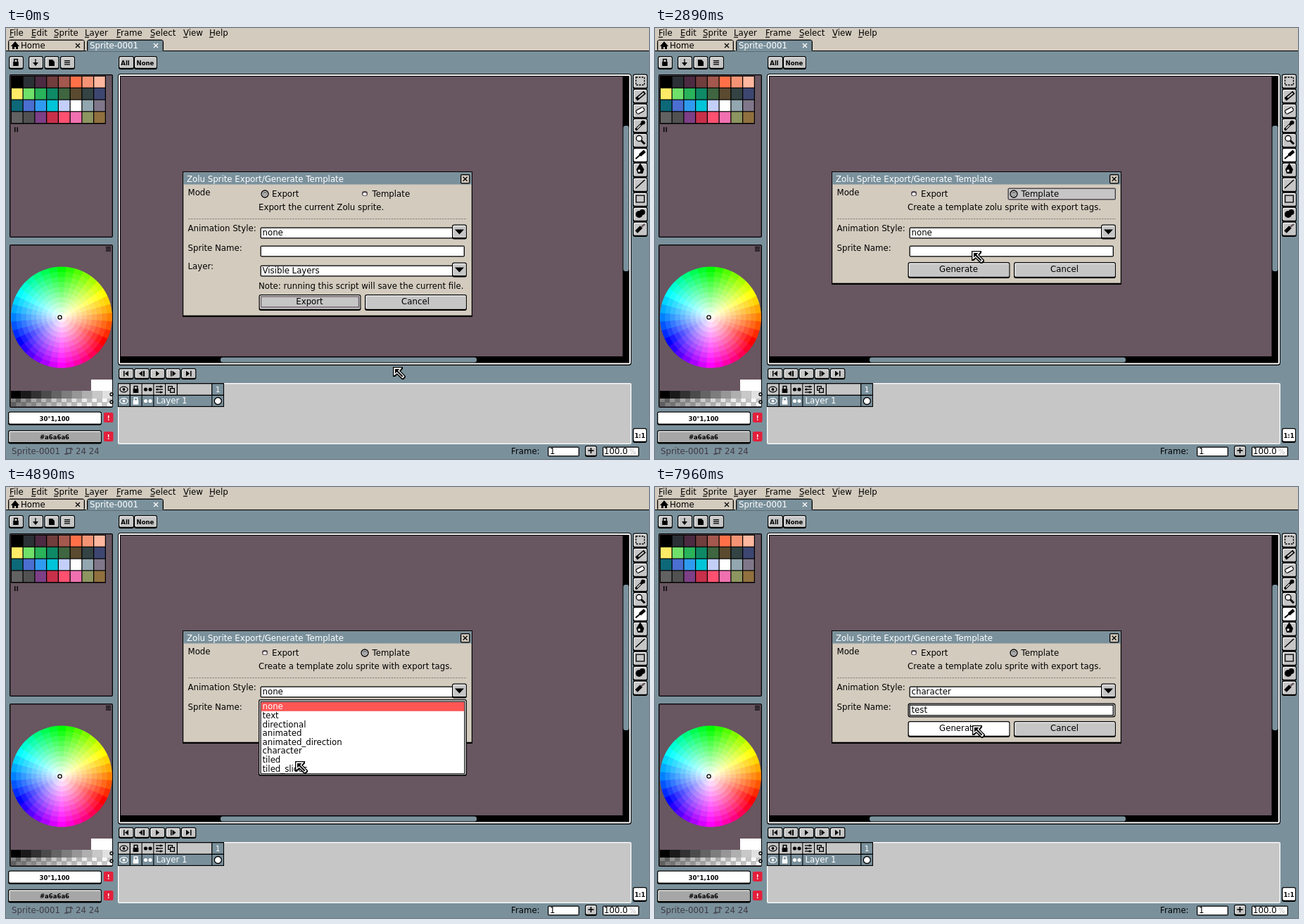
Write an HTML page with a canvas that moves like this. It is 914 px wide and 613 px high and loops after 8 s.

```html
<!DOCTYPE html>
<html lang="en">
<head>
<meta charset="utf-8">
<title>Sprite export dialog</title>
<style>
html, body { margin: 0; width: 100%; height: 100%; overflow: hidden; background: #7d929e; }
canvas { display: block; }
</style>
</head>
<body>
<canvas id="stage" width="914" height="613"></canvas>
<script>
const W = 914, H = 613, LOOP = 8000;
const FACE = '#d3cbbe', SLATE = '#7a919c', PLUM = '#685661', GRAY = '#c6c6c6',
      RED = '#ff5555', HOT = '#ffebb6', BLACK = '#000', WHITE = '#fff';
const screenCtx = document.getElementById('stage').getContext('2d');
const backdrop = document.createElement('canvas');
backdrop.width = W;
backdrop.height = H;
let g = backdrop.getContext('2d');

// Drawing helpers
function rect(x, y, w, h, color) {
  g.fillStyle = color;
  g.fillRect(x, y, w, h);
}
function round(x, y, w, h, color, r = 2) {
  g.fillStyle = color;
  g.beginPath();
  g.roundRect(x, y, w, h, r);
  g.fill();
}
function framed(x, y, w, h, fill, edge = BLACK, line = 1.3, r = 2) {
  round(x, y, w, h, edge, r);
  rect(x + line, y + line, w - 2 * line, h - 2 * line, fill);
}
function label(s, x, y, color = BLACK, size = 11.75, weight = 'normal', align = 'left') {
  g.font = `${weight} ${size}px "DejaVu Sans", sans-serif`;
  g.textAlign = align;
  g.fillStyle = color;
  g.fillText(s, x, y);
}
function mini(s, x, y, color = BLACK) {
  label(s, x, y, color, 8.5, 'bold', 'center');
}
function poly(points, color) {
  g.fillStyle = color;
  g.beginPath();
  points.forEach(([x, y]) => g.lineTo(x, y));
  g.fill();
}
function line(x1, y1, x2, y2, color = BLACK, width = 1.3) {
  g.strokeStyle = color;
  g.lineWidth = width;
  g.beginPath();
  g.moveTo(x1, y1);
  g.lineTo(x2, y2);
  g.stroke();
}
function disc(x, y, r, fill, stroke) {
  g.beginPath();
  g.arc(x, y, r, 0, 2 * Math.PI);
  if (fill) { g.fillStyle = fill; g.fill(); }
  if (stroke) { g.strokeStyle = stroke; g.lineWidth = 1.3; g.stroke(); }
}
function button(x, y, w, h, fill = GRAY) {
  round(x, y, w, h, BLACK, 3);
  round(x + 1.3, y + 1.3, w - 2.6, h - 3.9, WHITE, 1.5);
  rect(x + 2.5, y + 2.5, w - 3.8, h - 5.1, fill);
}
function cross(x, y, r, color = BLACK) {
  line(x - r, y - r, x + r, y + r, color);
  line(x - r, y + r, x + r, y - r, color);
}
function lock(x, y, color = BLACK) {
  rect(x - 3.8, y - 1, 7.6, 6, color);
  g.strokeStyle = color;
  g.lineWidth = 1.5;
  g.strokeRect(x - 2.3, y - 4.5, 4.6, 4.5);
}
function eye(x, y, color) {
  g.strokeStyle = color;
  g.lineWidth = 1.3;
  g.beginPath();
  g.ellipse(x, y, 5.5, 3.8, 0, 0, 2 * Math.PI);
  g.stroke();
  disc(x, y, 1.9, color);
}
function burger(x, y, w = 7) {
  for (let i = 0; i < 3; i++) rect(x, y + i * 2.6, w, 1.3, BLACK);
}

// Application window behind the dialog
function drawMenuAndTabs() {
  rect(0, 0, W, H, SLATE);
  rect(0, 0, W, 32, FACE);
  const menu = { File: 5, Edit: 36, Sprite: 68, Layer: 112, Frame: 157, Select: 205, View: 252, Help: 289 };
  for (const [name, x] of Object.entries(menu)) {
    label(name, x, 11);
    rect(x, 12.5, 6, 1.2, BLACK);
  }
  framed(3, 16.5, 109, 17, FACE, BLACK, 1.3, 4);
  framed(115, 16.5, 109, 18, SLATE, BLACK, 1.3, 4);
  rect(0, 32, 114, 1.3, BLACK);
  rect(224, 32, W, 1.3, BLACK);
  rect(0, 33.3, W, 4, SLATE);
  poly([[7, 26], [13, 19], [19, 26], [17, 26], [17, 30], [14, 30], [14, 27], [12, 27], [12, 30], [9, 30], [9, 26]], BLACK);
  label('Home', 21, 29);
  cross(102, 25, 3);
  label('Sprite-0001', 119, 29, WHITE);
  cross(213, 25, 3, WHITE);

  for (const x of [4, 32, 54.5, 77]) button(x, 40, 21, 19);
  lock(14, 49);
  line(42, 44, 42, 53);
  poly([[38, 49], [46, 49], [42, 54]], BLACK);
  poly([[61, 45], [66, 45], [69, 48], [69, 54], [61, 54]], BLACK);
  burger(83, 46, 8);
  button(160, 40, 22, 19);
  button(182, 40, 33, 19);
  mini('All', 169.5, 53);
  mini('None', 198, 53);
}

function drawPalette() {
  framed(5, 66, 147, 232, PLUM);
  const swatches = ('000000 2b3036 4b2a42 713d3d a4584e ff7048 f49474 ffb8a0 ' +
    'ffeb66 6fe06a 29b35a 0f8a66 3f6640 5a4a30 344343 3d4670 ' +
    '0d6878 4a6fd0 2f9bf0 00c4d8 c3cff8 ffffff 92a7b0 80788a ' +
    '626262 515151 7d3f86 c8304a ff5070 f070b0 8d9560 91703f').split(' ');
  rect(7, 68, 135, 68.5, BLACK);
  swatches.forEach((c, i) => rect(8 + (i % 8) * 16.75, 69 + (i >> 3) * 16.8, 15.5, 15.6, '#' + c));
  rect(12, 141, 1.4, 7, BLACK);
  rect(15.5, 141, 1.4, 7, BLACK);
}

function drawWheel() {
  framed(5, 308, 147, 232, PLUM);
  burger(142, 311);
  const rings = 10, step = 10, cx = 79, cy = 411.5, radius = 72;
  for (let ring = rings; ring > 0; ring--) {
    const light = 100 - 50 * (ring - 0.5) / (rings - 0.5);
    for (let a = 0; a < 360; a += step) {
      const from = -(a + step / 2 + 0.4) * Math.PI / 180, to = -(a - step / 2) * Math.PI / 180;
      g.fillStyle = `hsl(${30 + a} 100% ${light}%)`;
      g.beginPath();
      g.moveTo(cx, cy);
      g.arc(cx, cy, radius * ring / rings, from, to);
      g.fill();
    }
  }
  disc(76.5, 411.5, 2.6, WHITE, BLACK);

  rect(121, 500, 30, 16, WHITE);
  for (let i = 0; i < 10; i++) {
    const v = Math.min(255, i * 25), x = 7 + i * 14.4;
    rect(x, 516, 14.5, 11, `rgb(${v},${v},${v})`);
    for (let k = 0; k < 4; k++) {
      rect(x + (k % 2) * 7.2, 527 + (k >> 1) * 5.5, 7.3, 5.5, (k === 0 || k === 3) ? WHITE : '#c0c0c0');
    }
    rect(x, 527, 14.5, 11, `rgba(${v},${v},${v},${0.5 - i * 0.04})`);
  }
  disc(150, 521, 2, null, BLACK);
  disc(150, 532, 2, null, BLACK);

  button(3, 545.5, 133, 19.5, WHITE);
  mini('30°1,100', 69, 559);
  button(3, 572, 133, 19.5, '#a6a6a6');
  mini('#a6a6a6', 69, 585);
  for (const y of [547, 574]) {
    round(139, y, 13.5, 14, '#e3203c', 2);
    mini('!', 145.7, y + 10.5, WHITE);
  }
}

function drawEditor() {
  round(159, 65, 730, 415, BLACK, 4);
  round(160, 66, 728, 412.5, WHITE, 3);
  rect(162, 68, 724, 408.5, BLACK);
  rect(163, 69, 713.5, 398, PLUM);
  round(877.5, 139, 8, 207, SLATE, 3);
  round(305, 468.5, 364, 7, SLATE, 3);
}

function drawTimeline() {
  for (let i = 0; i < 5; i++) button(160 + i * 22.2, 484, 21.6, 16);
  const left = (x, y) => poly([[x, y], [x + 5, y - 4], [x + 5, y + 4]], BLACK);
  const right = (x, y) => poly([[x, y - 4], [x + 5, y], [x, y + 4]], BLACK);
  rect(167, 487.5, 1.5, 8, BLACK); left(169, 491.5);
  left(189, 491.5); rect(195, 487.5, 2, 8, BLACK);
  right(213, 491.5);
  rect(234, 487.5, 1.5, 8, BLACK); right(236.5, 491.5);
  right(256, 491.5); rect(262, 487.5, 1.5, 8, BLACK);

  framed(159, 505, 730, 87, GRAY, WHITE, 1.3);
  rect(159, 505, 151, 34, BLACK);
  [160, 177, 193.7, 210.4, 227.1].forEach(x => rect(x, 506.3, 15.6, 15.3, GRAY));
  rect(244, 506.3, 48, 15.3, GRAY);
  rect(293.3, 506.3, 15.6, 15.3, SLATE);
  [160, 177, 193.7].forEach(x => rect(x, 523, 15.6, 14.8, SLATE));
  rect(210.4, 523, 81.8, 14.8, SLATE);
  rect(293.3, 523, 15.6, 14.8, SLATE);
  [[514, BLACK], [530.5, WHITE]].forEach(([y, c]) => {
    eye(167.5, y, c);
    lock(184.5, y, c);
    disc(198.5, y, 2.6, c);
    disc(205, y, 2.6, c);
  });
  for (let i = 0; i < 3; i++) {
    line(213, 510 + i * 4, 223, 510 + i * 4);
    disc(i === 1 ? 215 : 220, 510 + i * 4, 1.6, BLACK);
  }
  framed(230, 509, 7, 7, GRAY, BLACK, 1.3, 0);
  framed(233, 512, 7, 7, GRAY, BLACK, 1.3, 0);
  label('1', 301, 518, WHITE, 10.5, 'normal', 'center');
  label('Layer 1', 213.5, 534, WHITE);
  disc(301.3, 530.5, 5, WHITE, BLACK);
}

function drawTools() {
  for (let i = 0; i < 11; i++) button(891, 65.5 + i * 21, 21, 21.5, i === 5 ? WHITE : GRAY);
  g.setLineDash([2.5, 1.5]);
  g.strokeStyle = BLACK;
  g.lineWidth = 1.3;
  g.strokeRect(895.5, 70, 12, 11);
  g.setLineDash([]);
  const pen = (y, color) => {
    line(896, y + 5, 908, y - 5, BLACK, 5);
    line(899, y + 2.5, 906.5, y - 3.8, color, 2.2);
  };
  pen(96.5, GRAY);
  g.save();
  g.translate(901.5, 117.5);
  g.rotate(-0.5);
  framed(-6.5, -3.5, 13, 7, WHITE, BLACK, 1.3, 3);
  g.restore();
  line(895, 145, 904, 136, BLACK, 3.5);
  disc(905.5, 134.5, 3, BLACK);
  line(897, 143, 902, 138, WHITE, 1.2);
  disc(900, 157, 4, WHITE, BLACK);
  line(903, 160, 908, 165, BLACK, 3);
  line(895, 186, 902, 180, BLACK, 2);
  line(901, 181, 908, 175, BLACK, 4.5);
  poly([[901.5, 192], [907, 201], [905, 207], [898, 207], [896, 201]], BLACK);
  disc(900, 203, 1.7, WHITE);
  line(895, 228, 908, 216, BLACK, 1.5);
  framed(895, 237.5, 13, 11, GRAY, BLACK, 1.3, 0);
  disc(900, 265, 5, BLACK);
  disc(904.5, 262, 4, BLACK);
  line(896, 290, 903, 283, BLACK, 5);
  line(903, 283, 908, 279, PLUM, 2.5);
  button(891, 569, 20, 21, WHITE);
  mini('1:1', 901, 583);
}

function drawStatus() {
  const ink = '#403a44';
  label('Sprite-0001', 8, 606, ink);
  g.strokeStyle = ink;
  g.lineWidth = 1.2;
  g.strokeRect(86, 598, 6, 7);
  line(83, 606, 88, 606, ink);
  line(92, 597, 95, 600, ink);
  label('24 24', 99, 606, ink);
  label('Frame:', 718, 606);
  framed(770, 595.5, 45, 14, WHITE);
  label('1', 773, 606);
  button(823, 594, 17, 16);
  line(827.5, 601, 835.5, 601, BLACK, 1.6);
  line(831.5, 597, 831.5, 605, BLACK, 1.6);
  framed(848, 595.5, 52, 14, WHITE);
  label('100.0', 850, 606);
  label('%', 886, 606, '#bbb', 10);
}

// Dialog
const STYLES = ['none', 'text', 'directional', 'animated', 'animated_direction', 'character', 'tiled', 'tiled_slices'];
const TYPED_AT = [7130, 7210, 7290, 7360];
const TEXT = 'test';

function radio(x, y, on) {
  if (on) {
    disc(x, y, 5, GRAY, BLACK);
    round(x - 2.8, y - 3, 5.6, 5.6, '#777', 2);
    rect(x - 2, y - 0.7, 4, 2, GRAY);
  } else {
    round(x - 4, y - 4, 8, 7, '#51474f', 3);
    round(x - 2.6, y - 1.8, 5.2, 4, WHITE, 2);
  }
}
function combo(y, value, hot) {
  framed(361.5, y, 275, 16, WHITE);
  label(value, 364.5, y + 11);
  button(634, y - 4, 21, 21, hot ? WHITE : GRAY);
  poly([[638, y + 3], [651, y + 3], [644.5, y + 10]], BLACK);
}
function pushButton(x, y, text, hot, focused) {
  button(x, y, 145, 23, hot ? WHITE : GRAY);
  if (focused) {
    g.strokeStyle = PLUM;
    g.lineWidth = 1.3;
    g.strokeRect(x + 3, y + 3, 139, 15);
  }
  label(text, x + 72, y + 14, BLACK, 11.75, 'normal', 'center');
}
function drawPopup(selected) {
  round(359, 302, 296, 109, BLACK, 3);
  round(360.3, 303.3, 293.4, 106, WHITE, 2);
  framed(361.5, 304.5, 291, 104, WHITE, BLACK, 1.2, 1);
  STYLES.forEach((name, i) => {
    const y = 306 + i * 12.6;
    if (i === selected) rect(362.7, y, 288.6, 12.8, RED);
    label(name, 364.5, y + 10.3, i === selected ? WHITE : BLACK);
  });
}

function drawDialog(t, tip) {
  const over = (x1, y1, x2, y2) => tip.x >= x1 && tip.x < x2 && tip.y >= y1 && tip.y < y2;
  const template = t >= 2310, chosen = t >= 5500 ? 5 : 0;
  const open = t >= 3430 && t < 5710;
  const bottom = template ? 365 : 411;

  rect(251, 204, 412, bottom - 204, BLACK);
  rect(252.2, 205.2, 409.6, bottom - 207.5, FACE);
  rect(252.2, 205.2, 409.6, 17.3, SLATE);
  label('Zolu Sprite Export/Generate Template', 257, 218.5, WHITE);
  framed(646, 208, 13.5, 13.5, FACE);
  cross(652.7, 214.7, 3);

  label('Mode', 258.5, 237.5);
  if (!template && over(359, 227, 502, 245)) rect(359, 227.5, 137, 16.5, HOT);
  if (t >= 2180 && t < 3430) framed(501.5, 227.5, 153.5, 17, GRAY, '#3f373d');
  else if (t < 2180 && over(502, 227, 655, 245)) rect(501.5, 227.5, 153.5, 16.5, HOT);
  radio(368, 236, !template);
  label('Export', 378, 240);
  radio(510, 236, template);
  label('Template', 520.5, 240);
  label(template ? 'Create a template zolu sprite with export tags.' : 'Export the current Zolu sprite.', 359, 259);
  g.setLineDash([2.5, 1.3]);
  line(259, 271.5, 655, 271.5, '#8b8178', 1.2);
  g.setLineDash([]);

  label('Animation Style:', 258.5, 288.5);
  combo(283.5, STYLES[chosen], !open && over(361, 280, 655, 301));
  label('Sprite Name:', 258.5, 316.5);

  if (!open) {
    const focused = t >= 6220;
    if (focused) {
      round(359.5, 307.5, 295, 20, BLACK, 3);
      round(360.8, 308.8, 292.4, 17.4, WHITE, 2);
    }
    framed(361.5, 309.5, 290.5, 16, WHITE, BLACK, 1.3, focused ? 0 : 2);
    const typed = TEXT.slice(0, TYPED_AT.filter(at => t >= at).length);
    label(typed, 364.5, 320.5);
    if ((focused && t < 6790) || (t >= 7130 && t < 7800)) {
      rect(365.5 + g.measureText(typed).width, 311.5, 2.4, 12, BLACK);
    }
    if (!template) {
      label('Layer:', 258.5, 343);
      combo(337.5, 'Visible Layers', false);
      label('Note: running this script will save the current file.', 359, 371);
    }
    const y = template ? 333 : 379;
    pushButton(359.5, y, template ? 'Generate' : 'Export', over(360, y, 504, y + 22), !template);
    pushButton(510, y, 'Cancel', false, false);
  } else {
    drawPopup(chosen);
  }
}

// Pointer: time, x, y
const PATH = [
  [0, 549.5, 481.5], [20, 549.5, 481.5], [250, 450, 400], [480, 325, 300], [600, 297, 270], [810, 326, 248],
  [1050, 362, 242], [1350, 430, 235], [1600, 500.5, 228.5], [1620, 512, 228.5], [1830, 530, 230.5],
  [2780, 530, 230.5], [2890, 451, 317], [2970, 412, 326], [3060, 397, 306], [3150, 405, 290],
  [3520, 405, 290], [3850, 438, 318], [4150, 468.5, 330], [4190, 464, 329],
  [4600, 440, 362], [5030, 405, 396], [5170, 405, 396], [5480, 416, 375.5],
  [5960, 416, 375.5], [6200, 434, 317.5], [7800, 434, 317.5], [7960, 450.5, 338.5], [8000, 450.5, 338.5]
];
function slope(i, axis) {
  const a = PATH[i - 1], b = PATH[i], c = PATH[i + 1];
  if (!a || !c) return 0;
  // Rest at turning points so a pause never overshoots.
  if ((b[axis] - a[axis]) * (c[axis] - b[axis]) <= 0) return 0;
  return (c[axis] - a[axis]) / (c[0] - a[0]);
}
function pointerAt(t) {
  let i = 0;
  while (i < PATH.length - 2 && t >= PATH[i + 1][0]) i++;
  const a = PATH[i], b = PATH[i + 1], span = b[0] - a[0], u = (t - a[0]) / span;
  const at = axis => {
    const ease = u * u * (3 - 2 * u);
    return a[axis] + (b[axis] - a[axis]) * ease +
      span * (slope(i, axis) * u * (1 - u) ** 2 - slope(i + 1, axis) * u * u * (1 - u));
  };
  return { x: at(1), y: at(2) };
}
function drawPointer({ x, y }) {
  g.save();
  g.translate(Math.round(x), Math.round(y));
  poly([[0, 0], [14, 0], [14, 3], [11, 6], [18, 13], [18, 15], [15, 18], [13, 18], [6, 11], [3, 14], [0, 14]], BLACK);
  poly([[1.3, 1.3], [12.6, 1.3], [9, 5.8], [16.6, 13.6], [13.8, 16.6], [5.8, 9], [1.3, 12.6]], WHITE);
  poly([[3, 3], [9.5, 3], [7, 5.5], [14.4, 13], [13, 14.4], [5.5, 7], [3, 9.5]], BLACK);
  g.restore();
}

[drawMenuAndTabs, drawPalette, drawWheel, drawEditor, drawTimeline, drawTools, drawStatus].forEach(draw => draw());
g = screenCtx;

const start = performance.now();
function frame() {
  const t = (performance.now() - start) % LOOP, tip = pointerAt(t);
  g.drawImage(backdrop, 0, 0);
  drawDialog(t, tip);
  drawPointer(tip);
  requestAnimationFrame(frame);
}
frame();
</script>
</body>
</html>
```
